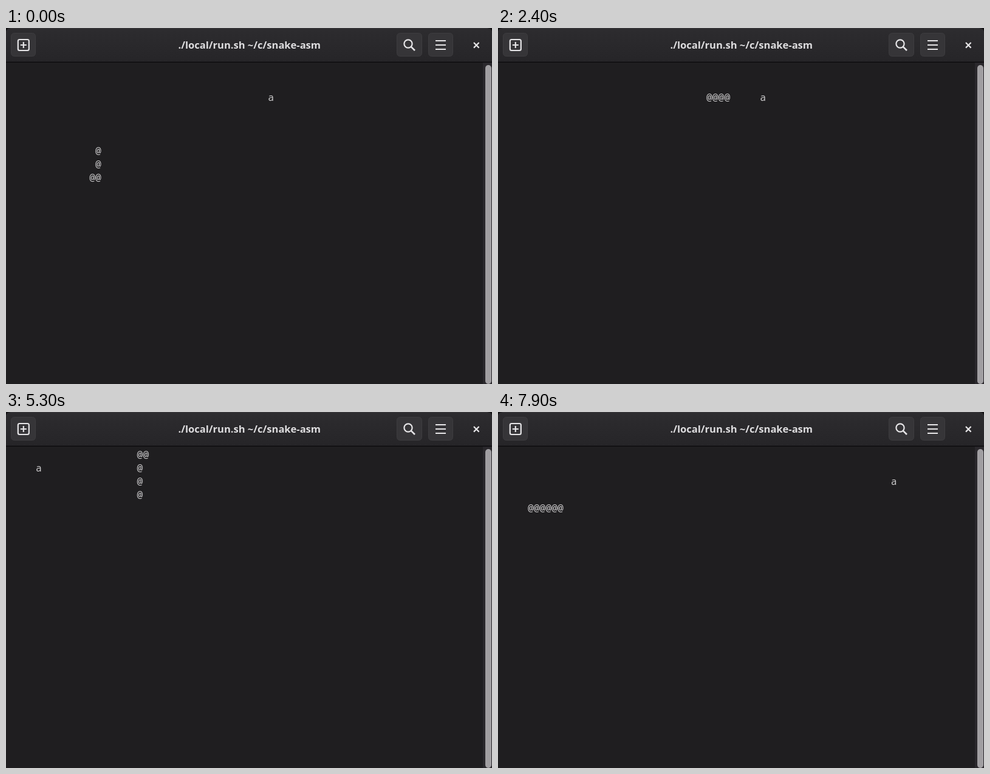
Write an HTML page that moves like this. It is 800x586 px and loops after 8 s.

```html
<!DOCTYPE html>
<html lang="en">
<head>
<meta charset="utf-8">
<title>Snake in a terminal</title>
<style>
  html, body { margin: 0; width: 100%; height: 100%; overflow: hidden; background: #1f1e20; }
  svg { display: block; width: 800px; height: 586px; }
  .title { font: 700 16.5px "Noto Sans", "Open Sans", sans-serif; fill: #dedddf; text-anchor: middle; }
  #board { font: 16.33px "Noto Sans Mono", monospace; fill: #cbcacb; }
  .button { fill: #363538; stroke: #3d3c3f; }
  .icon { fill: none; stroke: #e6e5e7; stroke-width: 2.2; }
</style>
</head>
<body>
<svg viewBox="0 0 800 586">
  <defs>
    <linearGradient id="bar" x2="0" y2="1">
      <stop offset="0" stop-color="#2d2c2f"/>
      <stop offset="1" stop-color="#262528"/>
    </linearGradient>
  </defs>
  <rect width="800" height="586" fill="#1f1e20"/>

  <rect width="800" height="12" fill="#111012"/>
  <path d="M0 56V8Q0 0 8 0H792Q800 0 800 8V56Z" fill="url(#bar)"/>
  <path d="M7 .5H793" stroke="#38373a"/>
  <path d="M0 56.3H800" stroke="#0d0c0e" stroke-width="1.6"/>

  <rect class="button" x="8.5" y="8.5" width="40" height="38" rx="5"/>
  <rect class="button" x="643.5" y="8.5" width="41" height="38" rx="5"/>
  <rect class="button" x="695.5" y="8.5" width="40" height="38" rx="5"/>
  <g class="icon">
    <rect x="19.8" y="19" width="18" height="18" rx="2.5"/>
    <path d="M23.8 28H33.8M28.8 23V33"/>
    <circle cx="662" cy="26" r="6.6"/>
    <path d="M666.8 30.8L673 37" stroke-width="2.6"/>
    <path d="M707 21H724M707 28H724M707 35H724"/>
    <path d="M770 24L778.6 32.6M778.6 24L770 32.6"/>
  </g>
  <text class="title" x="400.8" y="33.6">./local/run.sh ~/c/snake-asm</text>

  <rect x="785" y="57" width="15" height="529" fill="#2a282c"/>
  <rect x="789" y="61" width="10" height="525" rx="5" fill="#a19fa2"/>

  <g id="board"></g>
</svg>
<script>
const LOOP = 8000, TICK = 100;
const START = 3; // path index of the head at time zero

// Corners of the snake's route, in columns and rows.
const corners = [
  [14, 8], [15, 8], [15, 4], [29, 4], [29, 2], [45, 2], [45, 5], [42, 5],
  [42, 0], [22, 0], [22, 3], [18, 3], [18, 1], [5, 1], [5, 4], [10, 4]
];

// Key presses add a move; late ticks are caught up on the next one.
const presses = [3, 15, 16, 25, 26, 26, 27, 44, 47, 48, 49, 50, 51, 52, 53, 58];
const lateTicks = [17, 29, 45, 61, 67, 71];

// Each apple stays until the head has made the given number of moves.
const stages = [
  { until: 33, apple: [44, 2], length: 4 },
  { until: 59, apple: [28, 0], length: 5 },
  { until: 87, apple: [5, 1], length: 5 },
  { until: Infinity, apple: [66, 2], length: 6 }
];

function expand(points) {
  const cells = [points[0]];
  for (const [x, y] of points.slice(1)) {
    let [cx, cy] = cells[cells.length - 1];
    while (cx !== x || cy !== y) {
      cx += Math.sign(x - cx);
      cy += Math.sign(y - cy);
      cells.push([cx, cy]);
    }
  }
  return cells;
}

const path = expand(corners);
const board = document.getElementById("board");

function glyph(char) {
  const node = document.createElementNS("http://www.w3.org/2000/svg", "text");
  node.textContent = char;
  return board.appendChild(node);
}

function place(node, cell) {
  node.style.display = cell ? "" : "none";
  if (!cell) return;
  node.setAttribute("x", cell[0] * 9.8);
  node.setAttribute("y", 75.8 + cell[1] * 22.05);
}

const apple = glyph("a");
const body = Array.from({ length: 6 }, () => glyph("@"));

function movesAt(tick) {
  if (lateTicks.includes(tick)) tick--;
  return tick + presses.filter(p => p <= tick).length;
}

let shown = -1;
function draw(tick) {
  if (tick === shown) return;
  shown = tick;
  const moves = movesAt(tick);
  const stage = stages.find(s => moves < s.until);
  place(apple, stage.apple);
  body.forEach((node, i) => place(node, i < stage.length ? path[START + moves - i] : null));
}

const begin = performance.now();
function frame() {
  draw(Math.floor((performance.now() - begin) % LOOP / TICK));
  requestAnimationFrame(frame);
}
frame();
</script>
</body>
</html>
```
